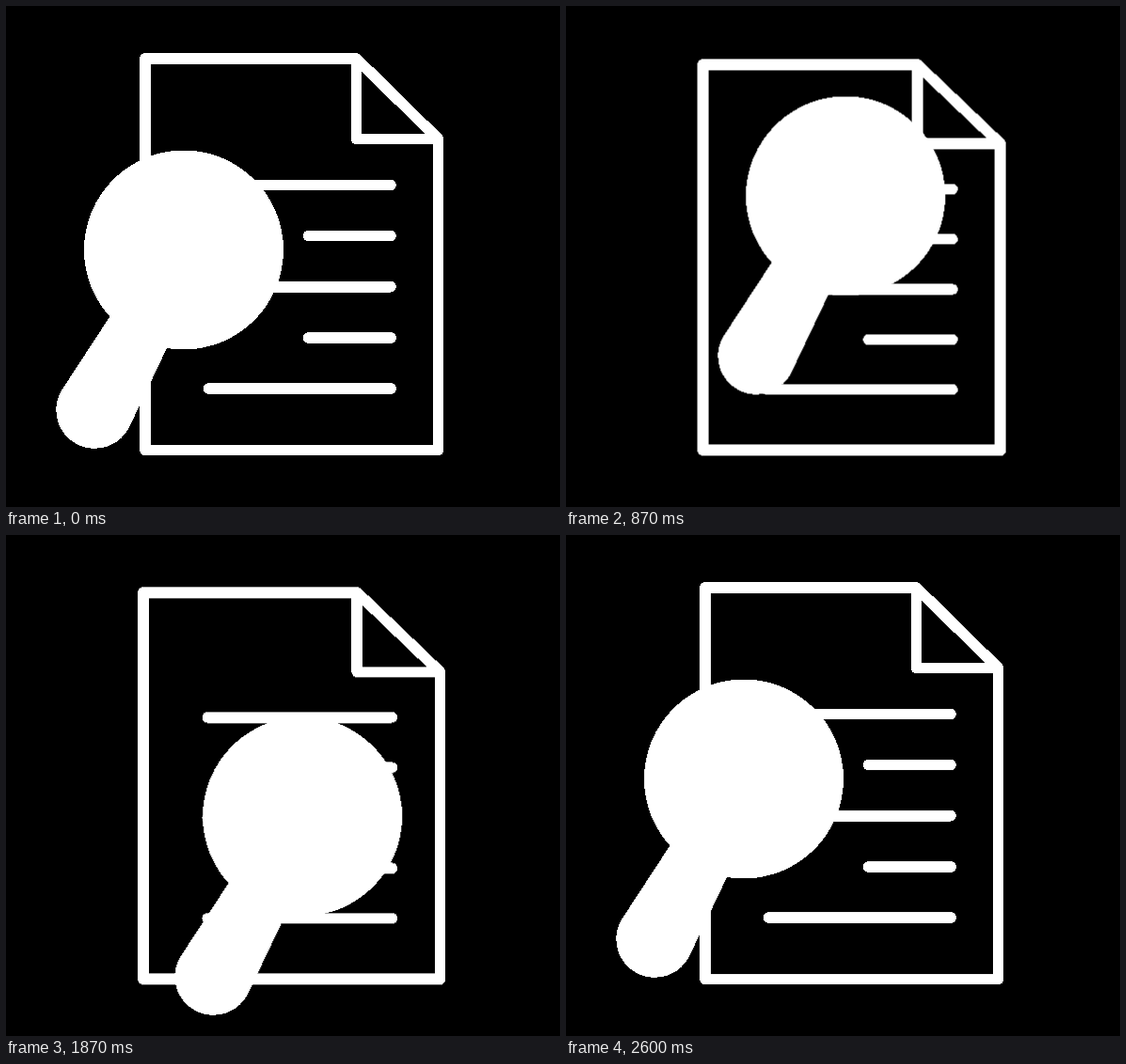
Write an HTML page without scripts that moves like this. It is 589 px wide and 533 px high and loops after 2.63 s.

```html
<!DOCTYPE html>
<html lang="en">
<head>
<meta charset="utf-8">
<title>Document search</title>
<style>
  html, body { margin: 0; width: 100%; height: 100%; overflow: hidden; background: #000; }
  svg { display: block; width: 589px; height: 533px; shape-rendering: crispEdges; }

  .page {
    fill: none;
    stroke: #fff;
    stroke-width: 11.7;
    stroke-linecap: round;
    stroke-linejoin: round;
    transform-origin: 304px 478px;
    animation: squash 1315ms cubic-bezier(.37, 0, .63, 1) infinite alternate;
  }
  .glass { fill: #fff; }
  .slide-x { animation: slide-x 2630ms cubic-bezier(.65, 0, .35, 1) infinite; }
  .slide-y { animation: slide-y 2630ms cubic-bezier(.65, 0, .35, 1) infinite; }

  @keyframes squash {
    to { transform: scale(1.02, .98); }
  }
  @keyframes slide-x {
    0%, 100% { transform: translateX(0); }
    34.8% { transform: translateX(108.5px); }
    63.1% { transform: translateX(133px); }
  }
  @keyframes slide-y {
    0%, 12%, 100% { transform: translateY(0); }
    35.4% { transform: translateY(-58px); animation-timing-function: cubic-bezier(.45, 0, .55, 1); }
    65%, 72.2% { transform: translateY(40px); }
  }
</style>
</head>
<body>
<svg viewBox="0 0 589 533">
  <g class="page">
    <path d="M372.5 56H148V472.5H459.5V141.5L372.5 56V141.5H459.5"/>
    <path d="M215.5 190.5H409M321.5 244.5H409M215.5 298.7H409M321.5 353H409M215.5 407H409"/>
  </g>
  <g class="slide-x">
    <g class="glass slide-y">
      <circle cx="189" cy="259.5" r="106"/>
      <path d="M110 331L59 409A41 41 0 1 0 132 446L171 364L189 259Z"/>
    </g>
  </g>
</svg>
</body>
</html>
```
